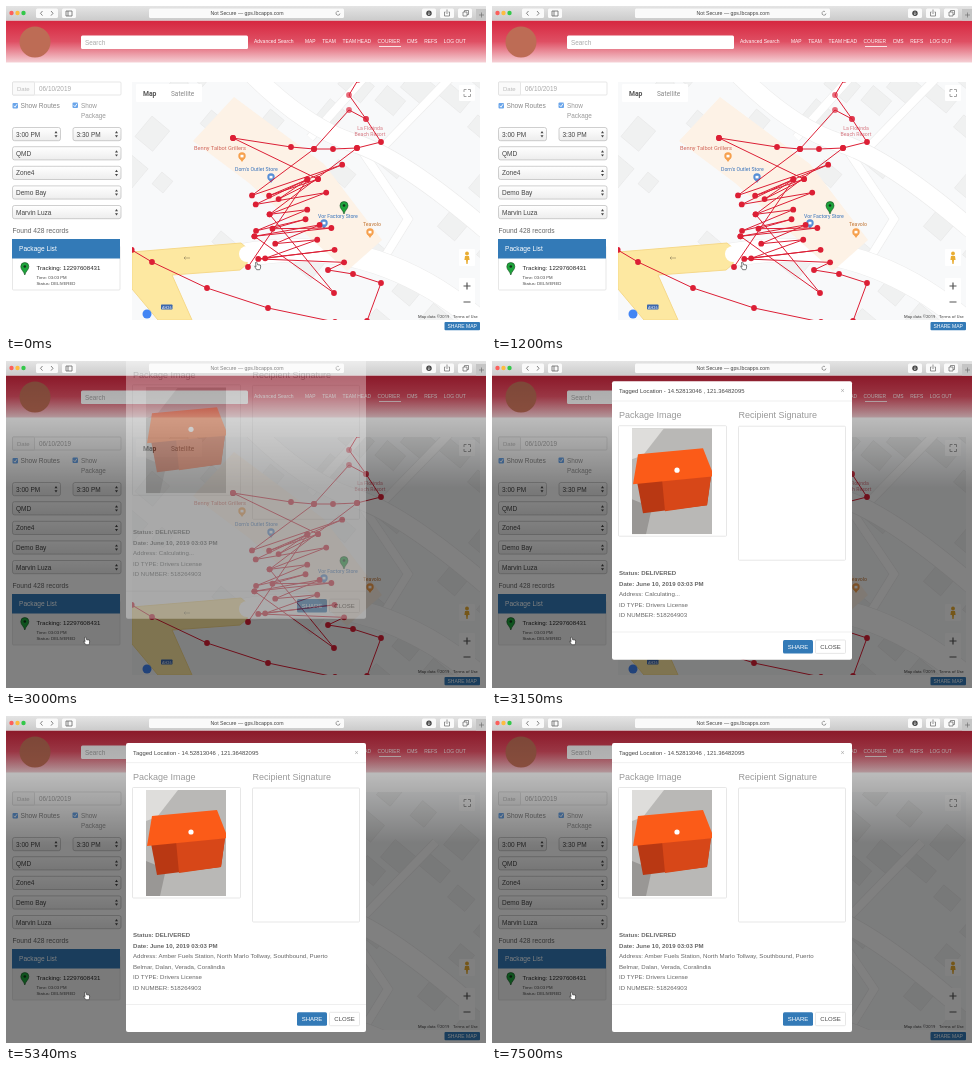
These frames come from a looping animation (480 by 327 pixels, 7.95 s). An HTML page:

```html
<!DOCTYPE html>
<html lang="en">
<head>
<meta charset="utf-8">
<title>Courier map</title>
<style>
html, body { margin: 0; width: 100%; height: 100%; overflow: hidden; background: #fff; }
svg { display: block; width: 480px; height: 327px; font-family: "Liberation Sans", Arial, sans-serif; }
.map { font-family: Roboto, sans-serif; }
</style>
</head>
<body>
<svg id="stage" viewBox="0 0 480 327"></svg>
<script>
const LOOP = 7950, GLIDE = 1200, HOVER = 2000, DIM = 2800, OPEN = 2950, LOADED = 3700;
const BLUE = '#337ab7', RED = '#dc1f35', ORANGE = '#f6a04d', SKY = '#568ed6';

const text = (x, y, size, s, fill = '#555', more = '') =>
  `<text x="${x}" y="${y}" font-size="${size}" fill="${fill}" ${more}>${s}</text>`;
const rect = (x, y, w, h, fill, more = '') =>
  `<rect x="${x}" y="${y}" width="${w}" height="${h}" fill="${fill}" ${more}/>`;
const dot = (x, y, r, fill, more = '') =>
  `<circle cx="${x}" cy="${y}" r="${r}" fill="${fill}" ${more}/>`;
const poly = (points, fill, more = '') => `<polygon points="${points}" fill="${fill}" ${more}/>`;
const line = (d, stroke, w = 1) => `<path d="${d}" fill="none" stroke="${stroke}" stroke-width="${w}"/>`;
const range = (n, f) => Array.from({ length: n }, (_, i) => f(i));
const rows = (n, f) => range(n, f).join('');
const group = (id, body, more = '') => `<g id="${id}" ${more}>${body}</g>`;
const bold = 'font-weight="bold"', mid = 'text-anchor="middle"';
const border = 'stroke="#ddd" stroke-width=".7" rx="1"';

function random(seed) {
  return () => (seed = (seed * 16807) % 2147483647) / 2147483647;
}

function browserBar() {
  const lights = ['#fc605c', '#fdbc40', '#34c84a'].map((c, i) => dot(5.5 + 6 * i, 7, 2.2, c)).join('');
  const button = (x, w) => rect(x, 2.5, w, 9.5, '#fafafa', 'rx="1.5"');
  return rect(0, 0, 480, 14.5, 'url(#bar)') + lights +
    button(30, 22) + button(56, 14) + button(143, 195) + rows(3, i => button(416 + 18 * i, 14)) +
    line('M36.5 5l-2 2.3 2 2.3M45 5l2 2.3-2 2.3M60 5h6v5h-6zM62 5v5', '#666', .8) +
    text(241, 9.4, 5.2, 'Not Secure — gps.lbcapps.com', '#444', mid) +
    line('M333 5.5a2 2 0 1 0 1 2', '#777', .7) +
    dot(423, 7.2, 2.7, '#444') + line('M423 5.5v3M421.8 7.5l1.2 1.2 1.2-1.2', '#fff', .6) +
    line('M439.5 6h-1v4h5V6h-1M441 8V3.5M457 6h4v4h-4zM458.5 6V4.5h4v4H461', '#666', .7) +
    rect(470, 3, 10, 11.5, '#c5c5c5') + line('M473 9h5M475.5 6.5v5', '#666', .6);
}

function header() {
  const nav = ['MAP', 'TEAM', 'TEAM HEAD', 'COURIER', 'CMS', 'REFS', 'LOG OUT']
    .map((s, i) => `<tspan dx="${i ? 6.6 : 0}">${s}</tspan>`).join('');
  return rect(0, 14.5, 480, 42, 'url(#head)') + dot(29, 36, 15.5, '#bd6c55') +
    rect(75, 29.5, 167, 13.5, '#fff', 'rx="1.5"') + text(79, 38.6, 6.4, 'Search', '#aaa') +
    text(248, 36.8, 5, 'Advanced Search', '#fff') + text(299, 36.8, 4.9, nav, '#fff') +
    rect(373, 40, 22, .8, '#fff');
}

function select(x, y, w, s) {
  const a = x + w - 4.5, m = y + 6.7;
  const arrow = dir => poly(`${a - 1.5},${m + dir} ${a + 1.5},${m + dir} ${a},${m + 3.2 * dir}`, '#444');
  return rect(x, y, w, 13.2, 'url(#field)', 'rx="2" stroke="#bbb" stroke-width=".7"') +
    text(x + 3.5, y + 9, 6.5, s, '#444') + arrow(-1) + arrow(1);
}

const check = (x, y) => rect(x, y, 5.5, 5.5, '#6aa5ea', 'rx="1"') +
  line(`M${x + 1.2} ${y + 2.8}l1.3 1.4 2-3`, '#fff', .9);

const pin = (x, y) => `<g transform="translate(${x} ${y})">
  <path d="M0 0C-1-4-4-5-4-8.5a4 4 0 0 1 8 0C4-5 1-4 0 0z" fill="#1da53b" stroke="#174d20" stroke-width=".6"/>
  ${dot(0, -8.5, 1.3, '#12331a')}</g>`;

function sidebar() {
  return rect(6.5, 76, 108.5, 13, '#fff', border) + rect(6.5, 76, 22, 13, '#fafafa', border) +
    text(11, 84.8, 6, 'Date', '#bbb') + text(33, 84.8, 6.4, '06/10/2019', '#aaa') +
    check(6.5, 97) + text(14.5, 102.3, 6.6, 'Show Routes', '#888') +
    check(66.5, 96.5) + text(75, 102, 6.4, 'Show', '#999') + text(75, 112, 6.4, 'Package', '#999') +
    select(6.5, 121.5, 48, '3:00 PM') + select(67, 121.5, 48, '3:30 PM') +
    ['QMD', 'Zone4', 'Demo Bay', 'Marvin Luza'].map((s, i) => select(6.5, 140.7 + 19.6 * i, 108.5, s)).join('') +
    text(6.5, 226.5, 6.7, 'Found 428 records', '#666') +
    `<rect id="card" x="6.5" y="240" width="107.5" height="44" ${border}/>` + rect(6, 233, 108, 19.5, BLUE) +
    text(13, 245, 6.6, 'Package List', '#fff') + pin(18.8, 269) +
    text(30.5, 263.7, 6.1, 'Tracking: 12297608431', '#222') +
    text(30.5, 272.5, 4.3, 'Time: 03:03 PM', '#444') + text(30.5, 279, 4.3, 'Status: DELIVERED', '#444');
}

// Blocks stand on a loose grid turned to the streets
function streets() {
  const rnd = random(11);
  const blocks = rows(96, i => {
    const x = 120 + 42 * (i % 12) + 12 * rnd(), y = -90 + 42 * Math.floor(i / 12) + 12 * rnd();
    return rnd() < .6 ? rect(x, y, 14 + 18 * rnd(), 14 + 18 * rnd(), '#f0f1f1', 'stroke="#e6e6e6" stroke-width=".6"') : '';
  });
  const road = (d, w) => line(d, '#ececec', w + 1.2) + line(d, '#fff', w);
  return `<g transform="rotate(40 300 195) translate(0 60)">${blocks}</g>` +
    road('M363 66L304 132M375 143L450 66', 8) + road('M344 127L402 213 378 252', 8) +
    road('M244 66Q300 122 348 137T480 224', 18) + road('M232 250Q310 236 370 256T480 322', 23);
}

const plaza = () => poly('187,135 228,91 318,158 376,234 341,265 243,177', '#fdf2e6') +
  poly('126,246 235,237 242,243 241,258 234,264 166,269 186,314 152,314 126,283', '#fde8a1',
    'stroke="#f6d98a" stroke-width="1"') +
  dot(241, 248, 8, '#fff') + line('M184 252h-6l1.5-1.5M178 252l1.5 1.5', '#8d815d', .6);

// A courier's walk: a slow approach, a street loop, then zigzags between two sides
function routes() {
  const rnd = random(29);
  const approach = [-.4, 0, 1, 2, 3].map(i => [146 + 52 * i + 3 * i * i, 256 + 29 * i - 3 * i * i]);
  const loop = [[227, 132], [285, 141], [308, 143], [327, 143], [351, 142], [375, 136], [360, 113], [343, 104], [308, 143]];
  const zigzag = range(22, i => i % 2
    ? [296 + 44 * rnd(), 150 + 4.5 * i + 14 * rnd()]
    : [246 + 38 * rnd(), 178 + 3.4 * i + 14 * rnd()]);
  const exit = [[322, 264], [347, 268], [375, 277], [361, 315]];
  const paths = [approach, [...loop, ...zigzag, ...exit], [[360, 113], [343, 89], [352, 74]],
    [[227, 132], zigzag[3]], [[351, 142], zigzag[8], [328, 287], zigzag[14]], [[242, 261], zigzag[5]]];
  const fade = y => y < 115 ? .65 : 1;
  return paths.map(p => line('M' + p.join('L'), RED)).join('') +
    paths.flat().map(([x, y]) => dot(x, y, 2.9, RED, `opacity="${fade(y)}"`)).join('');
}

const poi = (x, y, fill) => dot(x, y, 3.7, fill) +
  poly(`${x - 2.4},${y + 2.5} ${x + 2.4},${y + 2.5} ${x},${y + 6}`, fill) + rect(x - 1.5, y - 1.2, 3, 2.6, '#fff');

function labels() {
  return poi(236, 150, ORANGE) + text(188, 143.5, 5.7, 'Benny Talbot Grillers', '#d16558') +
    poi(265, 171, SKY) + text(229, 165, 5.2, "Dorn's Outlet Store", '#3873bb') +
    poi(318, 217, SKY) + text(312, 212, 5.2, 'Vor Factory Store', '#3873bb') +
    poi(364, 226, ORANGE) + text(357, 219.5, 5.2, 'Teavolo', '#c07534') +
    text(364, 124, 5.2, 'La Florinda', '#d77a83', mid) + text(364, 130, 5.2, 'Beach Resort', '#d77a83', mid) +
    rect(155, 298.5, 11.5, 5, '#3b67ad', 'rx=".7"') + text(160.8, 302.6, 3.8, 'AH26', '#fff', mid);
}

function controls() {
  const box = (y, h) => rect(453, y, 16, h, '#fff', 'rx="1"');
  return rect(130, 78, 66, 18, '#fff', 'rx="1"') +
    text(137, 89.5, 6.8, 'Map', '#555', bold) + text(165, 89.5, 6.5, 'Satellite', '#888') +
    box(79, 16) + line('M458 86v-2.5h2.5M462 83.5h2.5V86M464.5 88v2.5H462M460.5 90.5H458V88', '#999', .9) +
    box(243, 17) + dot(461, 247.5, 1.9, '#e9ad32') +
    '<path d="M459 250h4l.6 4H462l-.4 4h-1.2l-.4-4h-1.6z" fill="#e9ad32"/>' +
    box(272, 32) + line('M457.5 280h7M461 276.5v7M457.5 296h7', '#555', 1.2) +
    dot(141, 308, 4.5, '#4285f4') +
    text(412, 312, 4.2, 'Map data ©2019', '#444') + text(447, 312, 4.2, 'Terms of Use', '#444');
}

function photo() {
  return '<g clip-path="url(#photo)">' + rect(140, 74, 80, 106, '#b9b8b6') +
    poly('140,74 172,74 151,101 140,105', '#dedddb') + poly('140,145 160,153 154,180 140,180', '#999795') +
    poly('144,122 219,122 215,151 151,159', '#b93813') + poly('170,125 219,122 215,151 173,157', '#d74718') +
    poly('146,100 211,94 222,122 141,130', '#fb5b18') + dot(185, 116, 2.6, '#fff') + '</g>';
}

function modal() {
  const grey = '#666';
  const row = (y, s, more) => text(127, y, 6.1, s, grey, more);
  const button = (x, s, fill, ink, more) =>
    rect(x, 296.3, 30, 13.4, fill, more) + text(x + 15, 305.2, 6, s, ink, mid);
  const waiting = row(242, 'Address: Calculating...');
  const address = row(242, 'Address: Amber Fuels Station, North Marlo Tollway, Southbound, Puerto') +
    row(252.5, 'Belmar, Dalan, Verada, Coralindia');
  const foot = row(263, 'ID TYPE: Drivers License') + row(273.5, 'ID NUMBER: 518264903') +
    rect(120, 288, 240, .6, '#e5e5e5') + button(291, 'SHARE', BLUE, '#fff', 'rx="1.5"') +
    button(323.5, 'CLOSE', '#fff', '#444', border);
  return group('modal', '<rect id="sheet" x="120" y="27" width="240" fill="#fff" rx="2"/>' +
    text(127, 39.2, 5.9, 'Tagged Location - 14.52813046 , 121.36482095', '#444') +
    text(350.5, 39, 7, '×', '#aaa', mid) + rect(120, 46.5, 240, .6, '#e5e5e5') +
    text(127, 64.3, 9, 'Package Image', '#999') + text(246.5, 64.3, 9, 'Recipient Signature', '#999') +
    rect(126.5, 71.5, 108, 110.5, '#fff', border) + photo() + rect(246.5, 72, 107, 134, '#fff', border) +
    row(221, 'Status: DELIVERED', bold) + row(231.5, 'Date: June 10, 2019 03:03 PM', bold) +
    group('waiting', waiting) + group('address', address) + group('foot', foot));
}

const gradient = (id, stops) => `<linearGradient id="${id}" x2="0" y2="1">` +
  stops.map(([at, c, o = 1]) => `<stop offset="${at}" stop-color="${c}" stop-opacity="${o}"/>`).join('') + '</linearGradient>';
const clip = (id, x, y, w, h) => `<clipPath id="${id}">${rect(x, y, w, h, '#000')}</clipPath>`;

function map() {
  return rect(126, 76, 348, 238, '#f8f9fa') + group('streets', streets()) +
    group('places', plaza() + labels() + routes() + pin(338, 208)) + controls();
}

document.getElementById('stage').innerHTML = '<defs>' +
  gradient('bar', [[0, '#e4e4e4'], [1, '#cbcbcb']]) +
  gradient('head', [[0, '#d6263f'], [.5, '#df4f63'], [1, '#f5d0d5']]) +
  gradient('field', [[0, '#fff'], [1, '#ededed']]) +
  gradient('shade', [[0, '#000', .35], [.14, '#000', .27], [.36, '#000', .5]]) +
  clip('mapArea', 126, 76, 348, 238) + clip('photo', 140, 74, 80, 106) + '</defs>' +
  rect(0, 0, 480, 327, '#fff') + header() + sidebar() +
  `<g class="map" clip-path="url(#mapArea)">${map()}</g>` +
  rect(438.5, 316, 35.5, 8.3, BLUE, 'rx="1"') + text(456.2, 322, 5, 'SHARE MAP', '#fff', mid) +
  rect(0, 14.5, 480, 312.5, 'url(#shade)', 'id="backdrop"') + browserBar() + modal() +
  '<path id="hand" d="M-1.5-3.5q1-1 1.5.3l.7 2 2.6.2.4 1-.3 2.5-.7 1.2h-3L-2.2.8q-.3-1 .8-.5l.5.4z" fill="#fff" stroke="#222" stroke-width=".6"/>';

const el = id => document.getElementById(id);
const set = (id, name, value) => el(id).setAttribute(name, value);
const show = (id, on) => set(id, 'display', on ? 'inline' : 'none');
const move = (id, x, y) => set(id, 'transform', `translate(${x} ${y})`);
const progress = (t, from, span) => Math.max(0, Math.min(1, (t - from) / span));
const easeOut = v => 1 - (1 - v) ** 2;
const easeInOut = v => v * v * (3 - 2 * v);

function draw() {
  const t = (performance.now() - start) % LOOP, loaded = t >= LOADED;
  const glide = easeInOut(progress(t, GLIDE, 900));
  move('hand', 251 - 171 * glide, 260 + 20 * glide);
  set('card', 'fill', t >= HOVER ? '#f3f3f3' : '#fff');
  set('backdrop', 'opacity', progress(t, DIM, 150));
  set('modal', 'opacity', progress(t, OPEN, 150));
  move('modal', 0, -70 * (1 - easeOut(progress(t, OPEN, 292))));
  show('waiting', !loaded);
  show('address', loaded);
  show('places', !loaded);
  move('streets', loaded ? -20 : 0, loaded ? 60 : 0);
  move('foot', 0, loaded ? 0 : -10.5);
  set('sheet', 'height', loaded ? 289 : 278.5);
  requestAnimationFrame(draw);
}
const start = performance.now();
draw();
</script>
</body>
</html>
```
